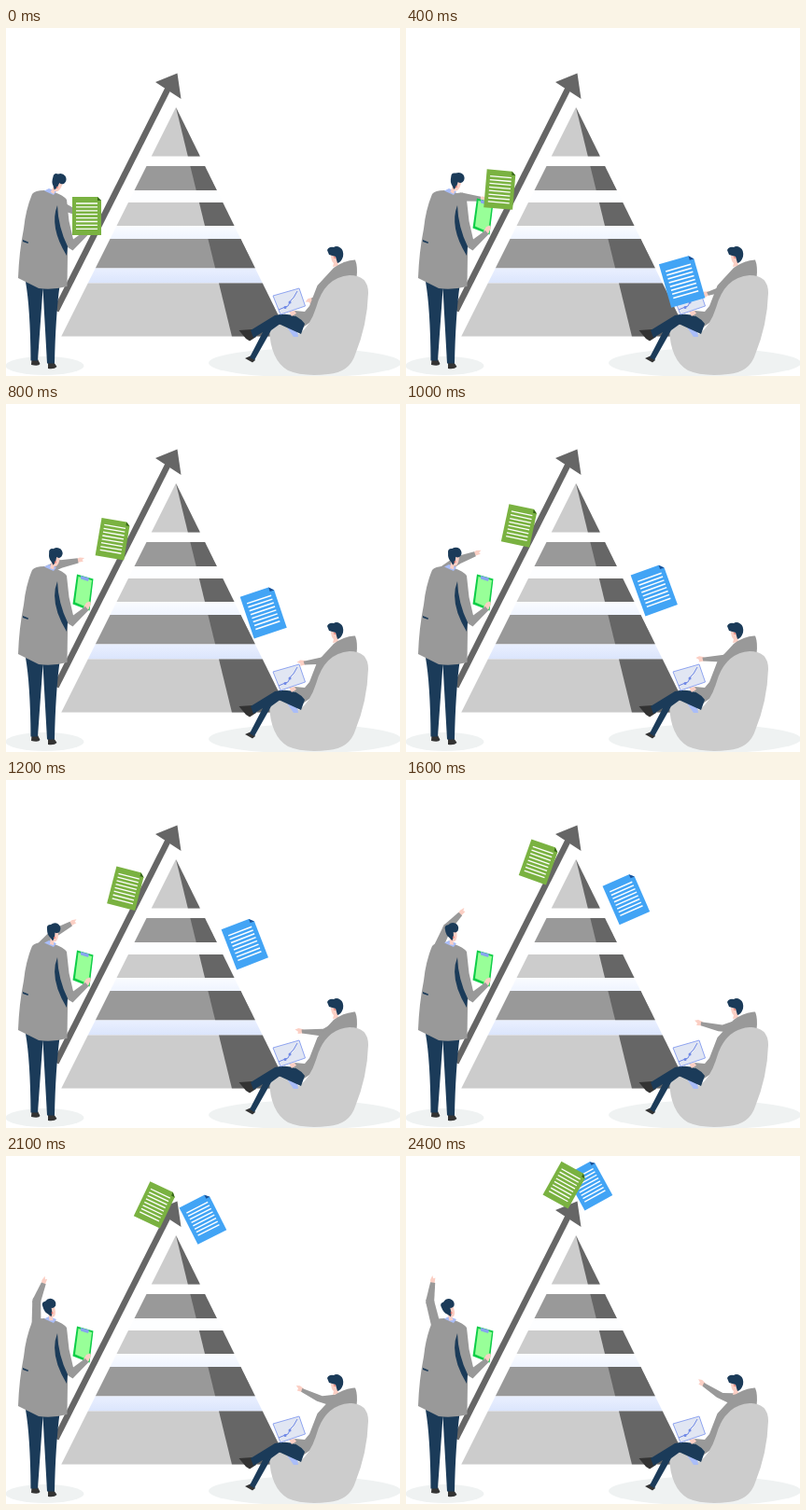
Recreate the animation shown at these times as an HTML page. Size 422 px wide and 373 px high, loop 2500 ms.

```html
<!DOCTYPE html>
<html lang="en">
<head>
<meta charset="utf-8">
<title>Documents rising to the top</title>
<style>
html, body { margin: 0; width: 100%; height: 100%; overflow: hidden; background: #fff; }
svg { display: block; width: 422px; height: 373px; }
.navy { fill: #1b3b59 }
.coat { fill: #999 }
.skin { fill: #fbcfc4 }
.shoe { fill: #333 }
.shirt { fill: #a9bdf8 }
</style>
</head>
<body>
<svg viewBox="0 0 422 373">
  <defs>
    <linearGradient id="gap1" x2="0" y2="1"><stop stop-color="#fafcff"/><stop offset="1" stop-color="#eff4ff"/></linearGradient>
    <linearGradient id="gap2" x2="0" y2="1"><stop stop-color="#eaf0ff"/><stop offset="1" stop-color="#dbe5fc"/></linearGradient>
  </defs>

  <g fill="#eff2f2">
    <ellipse cx="41.5" cy="362" rx="42" ry="10"/>
    <ellipse cx="320" cy="359" rx="103" ry="15.5"/>
  </g>

  <!-- arrow -->
  <path d="M53.500 303L173.500 65" stroke="#666" stroke-width="6.500"/>
  <path d="M160 58L183.500 48.500 187.500 76Z" fill="#666"/>

  <g id="pyramid"></g>

  <!-- standing man -->
  <g>
    <path class="shoe" d="M27.500 355H34L36.500 360Q35 363 27 361ZM45 358H51L54.500 363Q52 366 45 365Z"/>
    <path class="navy" d="M21 272Q26 300 26.500 356.500H34L39.500 279 44 359.500H52Q53 310 57.500 276Z"/>
    <g id="arm" class="coat">
      <circle r="4"/>
      <path d="M0-4L28-4.500V4.500L0 6Z"/>
      <g id="forearm">
        <path class="skin" d="M19-2L23-3 28-1.500 25 0 26 2 19 2Z"/>
        <circle r="4.500"/>
        <path d="M0-4.500L20.500-2.600V2.600L0 4.500Z"/>
      </g>
    </g>
    <path d="M76 182.500L93.500 187.500 89.500 221.500 71.500 214.500Z" fill="#0fce48"/>
    <path d="M77.500 185L92 189 88 218.500 74 212.500Z" fill="#98ff98"/>
    <path d="M80 184L89 186.500 88 190 80 187.500Z" fill="#86a4ef"/>
    <path class="skin" d="M83 218L86 213 90 211.500 91 214 88 221Z"/>
    <path class="coat" d="M28 178Q31 174 41 174L52 176Q61 179 65 184L67.500 207 72 226.500 85 217 88.500 221 71.500 238.500 66 235V244L65.500 277Q50 281 35 279L13 268Q14 240 19 215Q21 195 28 178Z"/>
    <path class="navy" d="M55 190Q46 213 65 244L66 234Q56 214 55 190ZM18 227L24 229.500 23.500 231 18 229Z"/>
    <path class="shirt" d="M41 174.500L46 172 54 175 51 179Z"/>
    <g id="head">
      <path class="skin" d="M51 163L56 162.500Q56.500 170 53.500 173L51 173.500V177L47 176 48 168Z"/>
      <path class="navy" d="M44 160Q43 155 48 155Q52 152 56 154.500Q60 158 57.500 162.500Q55 165 52.500 163.500L52 169 50 172.500 47.500 169Q44 166 44 160Z"/>
      <circle cx="52" cy="169" r="1" fill="#ef8079"/>
    </g>
  </g>

  <!-- seated man -->
  <g>
    <g id="pointer" class="coat">
      <path class="skin" d="M-45 2L-50 0 -54 1 -51 3.500 -51.500 6 -45 6Z"/>
      <path d="M5-8L-24 4 -47 2V6L-28 11 5 12Z"/>
    </g>
    <path class="skin" d="M348 242L354 243 356 255 350 256 351 252Q348 250 348 242Z"/>
    <path class="coat" d="M351 257Q362 249 374 248.500Q377 256 375.500 268L340 305 318 321 307 306 309 303 320 304 325 298 333.500 276Z"/>
    <path class="navy" d="M344 238Q346 234 351 235Q354 233 358 235.500Q362 238 361 245Q359 251 355 252L353 245 346 243Z"/>
    <circle cx="352" cy="246" r="1" fill="#ef8079"/>
    <path d="M282 322Q284 317 296 318L314 328Q326 319 332 300Q341 267 368 265Q388 265 388 284Q387 318 374 350Q368 369 345 371Q318 374 302 367Q283 356 282 322Z" fill="#ccc"/>
    <path class="shirt" d="M299 318L311 320 313 331 308 331Z"/>
    <path class="shoe" d="M249.500 324L264 323 268 331 261 335.500 257 333ZM256 354L263 351 267 356 264 358.500Z"/>
    <path class="navy" d="M288 308Q310 303 320 317L316 328 293 317.500 284 324 266 356 261 353 275 326 265 332 262 324Z"/>
    <path class="skin" d="M303 304L309 303 311 306 306 309Z"/>
    <path d="M286 287L314 279 320.500 298 294 307Z" fill="#e1e6f3" stroke="#8ea4f0"/>
    <path d="M292 302L299 299 302 298 305 292 308 289 312 282" fill="none" stroke="#6f88e6"/>
    <g fill="#6f88e6"><circle cx="299" cy="299.500" r="1.500"/><circle cx="304" cy="294" r="1.500"/></g>
  </g>

  <g id="blue"></g>
  <g id="green"></g>
</svg>
<script>
const $ = id => document.getElementById(id);

// Slices of the pyramid: top, bottom, left colour (a gap has no shaded side)
const slices = [
  [85, 137.5, '#ccc'], [148, 174, '#999'], [174, 187, '#fdfeff', true], [187, 212, '#ccc'],
  [212, 226, 'url(#gap1)', true], [226, 257.5, '#999'], [257.5, 273.5, 'url(#gap2)', true],
  [273.5, 330.5, '#ccc']
];
const edge = (slope, y) => `${182 + slope * (y - 85)} ${y}`;
const slab = (a, b, top, bottom, fill) =>
  `<path d="M${edge(a, top)}L${edge(b, top)} ${edge(b, bottom)} ${edge(a, bottom)}Z" fill="${fill}"/>`;
$('pyramid').innerHTML = slices.map(([top, bottom, fill, gap]) =>
  slab(-.5, .492, top, bottom, fill) + (gap ? '' : slab(.244, .492, top, bottom, '#666'))).join('');

// A 31 x 41 sheet centred on the origin, with eight ruled lines
function sheet(fill, fold, first, spacing) {
  let lines = '';
  for (let i = 0; i < 8; i++) lines += `M-11.500 ${first + i * spacing}h23`;
  return `<path d="M-15.500-20.500H11.500L15.500-16.500V20.500H-15.500Z" fill="${fill}"/>
    <path d="M11.500-20.500L15.500-16.500H11.500Z" fill="${fold}"/>
    <path d="${lines}" stroke="#fff" stroke-width="1.300"/>`;
}
$('green').innerHTML = sheet('#7ab241', '#37661a', -13.5, 3.9);
$('blue').innerHTML = sheet('#42a4f5', '#1a4f94', -12.6, 3.6);

const place = (id, transform) => $(id).setAttribute('transform', transform);

function draw(now) {
  const k = Math.floor(now / 100) % 25;
  const upper = -14.4 + 4.85 * k;
  const fore = -24 + 4.4 * k;
  place('arm', `translate(31.5 183.4) rotate(${-upper})`);
  place('forearm', `translate(28 0) rotate(${upper - fore})`);
  place('head', `rotate(${20 - k * 5 / 3} 48 178)`);
  place('pointer', `translate(363 260) rotate(${-37.3 + 2.54 * k})`);
  place('green', `translate(${86.5 + 3.48 * k} ${201.5 - 7.1 * k}) rotate(${1.21 * k})`);
  place('blue', `translate(${315.6 - 4.985 * k} ${319.3 - 12 * k}) rotate(${-13.4 - .64 * k}) scale(${1.24 - .006 * k} ${1.2 - .006 * k})`);
  $('blue').style.display = k < 3 ? 'none' : '';
  requestAnimationFrame(() => draw(performance.now() - start));
}
const start = performance.now();
draw(0);
</script>
</body>
</html>
```
